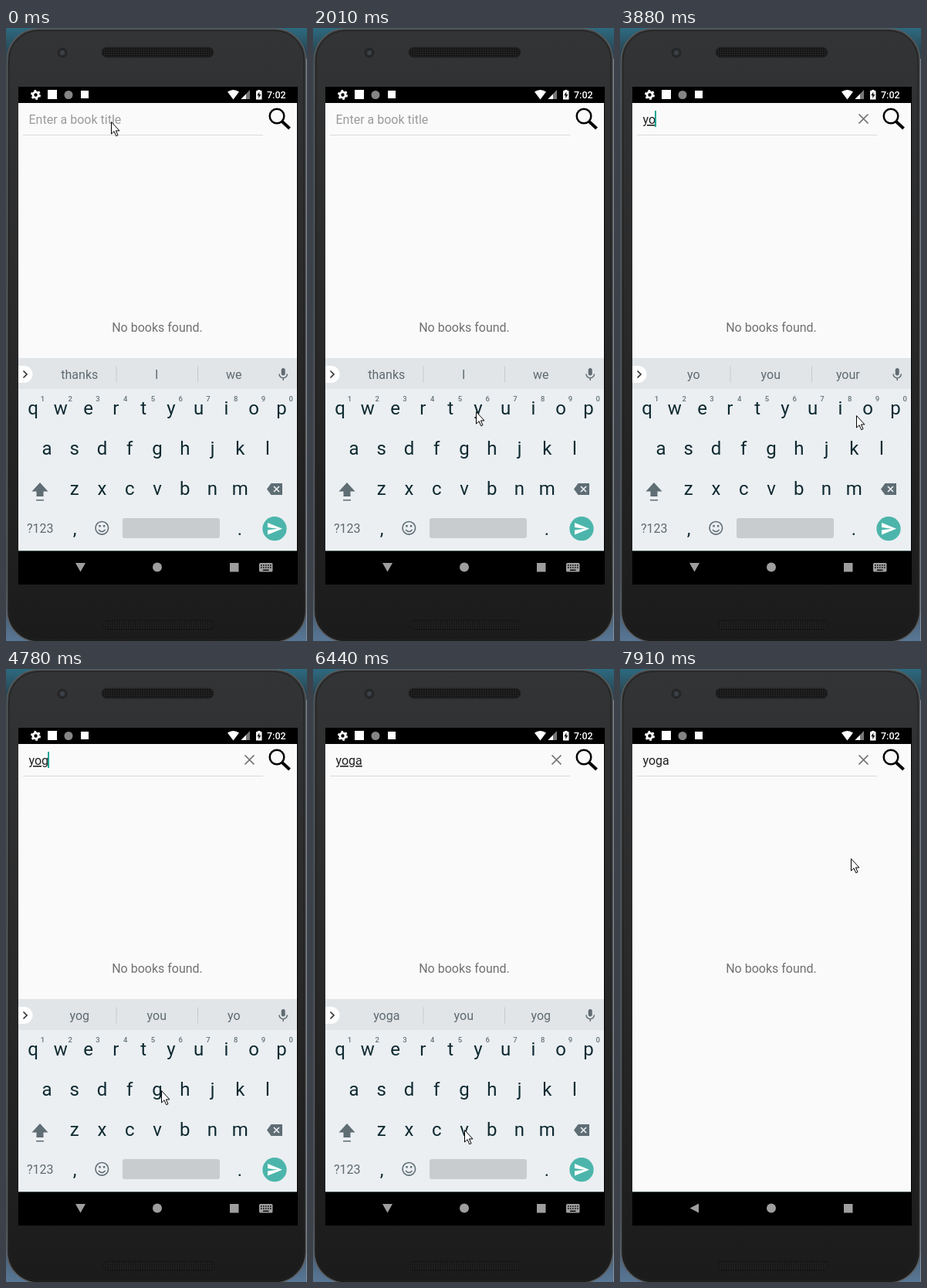
An HTML page that plays this animation: 390 px wide and 793 px high, repeating every 8 s.

```html
<!DOCTYPE html>
<html lang="en">
<head>
<meta charset="utf-8">
<title>Book search</title>
<style>
  html, body { margin: 0; width: 100%; height: 100%; overflow: hidden; background: #1c1c1c; }
  svg { display: block; width: 390px; height: 793px; font-family: Roboto, sans-serif; }
  .mid { text-anchor: middle; }
  .key { font-size: 24px; fill: #0f2a31; text-anchor: middle; }
  .digit { font-size: 9.5px; font-weight: 500; fill: #66737a; text-anchor: middle; }
  .label { font-size: 16px; fill: #5f6a70; }
</style>
</head>
<body>
<svg viewBox="0 0 390 793">
  <defs>
    <linearGradient id="desk" x2="0" y2="1">
      <stop offset="0" stop-color="#2d6a80"/><stop offset=".04" stop-color="#2a4653"/>
      <stop offset=".9" stop-color="#3a4550"/><stop offset="1" stop-color="#587796"/>
    </linearGradient>
    <linearGradient id="shell" x2="0" y2="1">
      <stop offset="0" stop-color="#333435"/><stop offset=".5" stop-color="#29292a"/>
      <stop offset="1" stop-color="#1b1b1b"/>
    </linearGradient>
    <pattern id="mesh" width="3" height="3" patternUnits="userSpaceOnUse">
      <path d="M0 0h3v3H0z" fill="#141414"/><circle cx="1.5" cy="1.5" r=".9" fill="#2b2b2b"/>
    </pattern>
    <filter id="shadow" x="-30%" y="-10%" width="160%" height="120%">
      <feDropShadow dx="0" dy="1" stdDeviation="1.3" flood-opacity=".4"/>
    </filter>
  </defs>

  <!-- phone -->
  <path d="M0 0h390v793H0z" fill="url(#desk)"/>
  <path d="M389 40h1v753h-1z" fill="#8492a0"/>
  <rect x="1.5" y="1" width="387" height="793" rx="40" fill="url(#shell)" stroke="#5a5b5c" stroke-width="1.5"/>
  <rect x="4" y="3.5" width="382" height="788" rx="38" fill="none" stroke="#202122"/>
  <circle cx="73" cy="32" r="6" fill="#272829" stroke="#222"/><circle cx="73" cy="32" r="3" fill="#3c4247"/>
  <rect x="124" y="25" width="145" height="13" rx="6.5" fill="url(#mesh)" stroke="#222"/>
  <rect x="126" y="766" width="144" height="12" rx="6" fill="url(#mesh)" stroke="#151515"/>

  <!-- screen and status bar -->
  <path d="M16 76h362v644H16z"/>
  <path d="M16 97h361v579H16z" fill="#fafafa"/>
  <g fill="#fff">
    <circle cx="38.5" cy="86.5" r="3.6" fill="none" stroke="#fff" stroke-width="2.8"/>
    <circle cx="38.5" cy="86.5" r="5.5" fill="none" stroke="#fff" stroke-width="2" stroke-dasharray="2.8 2.96"/>
    <path d="M54 80h12v12H54zM97 81h10v10H97z"/>
    <circle cx="81" cy="86.5" r="5.5" fill="#858585"/>
    <path d="M287 82.5Q294.5 77.5 302 82.5L294.5 92.5Z"/>
    <path d="M316 80V92H304.5Z" fill="#777"/><path d="M311 85.5V92H304.5Z"/>
    <path d="M326 80h3.5v1.3h2V92.5h-7.5V81.3h2z"/>
    <path d="M328.3 82.5l-3 4.8h2v3.6l3-5h-2z" fill="#000"/>
    <text x="338" y="91" font-size="12.5" font-weight="500">7:02</text>
  </g>

  <!-- search field -->
  <text id="query" x="29.5" y="124" font-size="16"></text>
  <rect id="caret" y="107" width="2" height="21" fill="#1aa595"/>
  <path d="M22 138.5h311" stroke="#dadada"/>
  <path id="clear" d="M309.5 111.5l12 12m0-12l-12 12" stroke="#707070" stroke-width="1.7"/>
  <circle cx="351" cy="114" r="9.3" fill="none" stroke="#000" stroke-width="2.5"/>
  <path d="M357.5 120.8L367.5 130" stroke="#000" stroke-width="4"/>
  <text class="mid" x="196" y="393" font-size="16" fill="#717171">No books found.</text>

  <!-- navigation bar -->
  <g fill="#9e9e9e">
    <path id="back"/>
    <circle cx="196" cy="697.5" r="6"/><path d="M290 692h11.5v11.5H290z"/>
  </g>

  <g id="keyboard">
    <path d="M16 427h361v40H16z" fill="#e1e5e8"/>
    <path d="M16 467h361v209H16z" fill="#ebeff2"/>
    <path d="M16 437h7.5a11 11 0 0 1 0 22H16z" fill="#fff"/>
    <path d="M22.5 443.5l4.5 4.5-4.5 4.5" fill="none" stroke="#333" stroke-width="1.7"/>
    <path d="M143 437.5v21M248.5 437.5v21" stroke="#c6cbce"/>
    <g id="suggestions" class="label mid"></g>
    <rect x="356.7" y="440" width="5" height="9.5" rx="2.5" fill="#606c72"/>
    <path d="M354 447.5a5.2 5.2 0 0 0 10.4 0M359.2 453v3" fill="none" stroke="#606c72" stroke-width="1.5"/>
    <g id="keys"></g>
    <g fill="#5f6d74">
      <path d="M44 588l10.5 11.5h-6V606h-9v-6.5h-6zM39 610h10v1.5H39z"/>
      <path d="M338 596.5l5.5-7.5H358v15h-14.5z"/>
      <path d="M347 593l7 7m0-7l-7 7" stroke="#ebeff2" stroke-width="1.7"/>
    </g>
    <text class="label" x="27" y="653">?123</text>
    <text class="key" x="89" y="656">,</text><text class="key" x="303" y="656">.</text>
    <g fill="none" stroke="#5f6d74" stroke-width="1.6">
      <circle cx="124.3" cy="646.8" r="8.3"/><path d="M120 649q4.3 5 8.6 0"/>
      <path d="M120.3 644.3h2.4m3.2 0h2.4" stroke-width="2.4"/>
    </g>
    <rect x="151" y="634" width="126" height="26" rx="3" fill="#c8cccf"/>
    <circle id="send" cx="348" cy="647.7" r="15.6"/>
    <path d="M339 640l19 7.8-19 7.8v-6l13-1.8-13-1.8z" fill="#fff"/>
    <rect x="328" y="692" width="17.5" height="11.5" rx="1.5" fill="#9e9e9e"/>
    <path d="M330 695h14M330 698h14" stroke="#000" stroke-width="1.6" stroke-dasharray="1.6 1.4"/>
    <path d="M333 701.3h7.5" stroke="#000" stroke-width="1.4"/>
    <g id="popup">
      <rect x="-18" y="-82" width="36" height="104" rx="3" fill="#d6dadd" filter="url(#shadow)"/>
      <text id="popupLetter" class="key" y="-48"></text>
      <path d="M6 -39.5h8" stroke="#333" stroke-width="1.5" stroke-dasharray="1.5 1.5"/>
    </g>
  </g>
  <path d="M16 676.5h361" stroke="#4c5f57"/>

  <path id="pointer" d="M.5 .5V16l3.6-3.3 2.6 6 2.3-1-2.6-5.8H11z" fill="#fff" stroke="#000"/>
</svg>

<script>
const LOOP = 8000;
const el = id => document.getElementById(id);
const set = (id, attrs) => Object.entries(attrs).forEach(([k, v]) => el(id).setAttribute(k, v));
const show = (id, on) => { el(id).style.display = on ? "" : "none"; };
const label = (cls, x, y, s) => `<text class="${cls}" x="${x}" y="${y}">${s}</text>`;

// Each key row is centred on the keyboard, apart from a shared pitch.
const PITCH = 35.75, CENTER = 196;
const keyAt = {};
let keyMarkup = "";
["qwertyuiop", "asdfghjkl", "zxcvbnm"].forEach((letters, row) => {
  const y = 500 + row * 52;
  [...letters].forEach((letter, i) => {
    const x = CENTER + (i - (letters.length - 1) / 2) * PITCH;
    keyAt[letter] = [x, y - 8];
    keyMarkup += label("key", x, y, letter);
    if (row === 0) keyMarkup += label("digit", x + 12.3, 483, (i + 1) % 10);
  });
});
el("keys").innerHTML = keyMarkup;

const WORD = "yoga", HINT = "Enter a book title";
const typedAt = [2250, 3730, 4780, 5800];
const PRESS = 120, BLINK = 500;
const SEND_DOWN = 7220, KEYBOARD_HIDDEN = 7370;
const suggestions = ["thanks I we", "y you your", "yo you your", "yog you yo", "yoga you yog"];

// Pointer moves: start time, end time and destination.
const POINTER_START = [136, 121], POINTER_STEP = 130;
const moves = [
  [950, 1890, 211, 496], [2300, 2790, 335, 497], [3730, 3880, 306, 501], [3880, 4390, 201, 545],
  [4900, 5560, 54, 545], [6100, 6980, 345, 649], [7550, 7910, 299, 245]
];

function pointerAt(t) {
  const sampled = t - (t + 20) % POINTER_STEP;
  let [px, py] = POINTER_START;
  for (const [start, end, x, y] of moves) {
    const u = Math.min(1, Math.max(0, (sampled - start) / (end - start)));
    const eased = u * (2 - u);
    px += (x - px) * eased;
    py += (y - py) * eased;
  }
  return [Math.round(px), Math.round(py)];
}

function caretOn(t) {
  const lastTap = [-BLINK, ...typedAt.map(time => time - PRESS), SEND_DOWN].findLast(time => time <= t);
  return Math.floor((t - lastTap) / BLINK) % 2 === 0;
}

function render(t) {
  const count = typedAt.filter(time => time <= t).length;
  const text = WORD.slice(0, count);
  const pressed = typedAt[count] - t <= PRESS ? WORD[count] : "";
  const typing = t < KEYBOARD_HIDDEN;

  el("query").textContent = text || HINT;
  set("query", {
    fill: text ? "#212121" : "#9b9b9b",
    "text-decoration": text && typing ? "underline" : "none"
  });
  show("clear", text);
  const textWidth = text ? el("query").getComputedTextLength() : 0;
  set("caret", { x: Math.round(28.5 + textWidth) });
  show("caret", caretOn(t));

  show("keyboard", typing);
  set("back", { d: typing ? "M90 692h13l-6.5 11.5z" : "M102 691.5v12l-11.5-6z" });
  set("send", { fill: t >= SEND_DOWN ? "#0ca296" : "#4cb5ab" });
  el("suggestions").innerHTML =
    suggestions[count].split(" ").map((word, i) => label("", 95.3 + i * 100, 454, word)).join("");

  show("popup", pressed);
  if (pressed) {
    set("popup", { transform: `translate(${keyAt[pressed]})` });
    el("popupLetter").textContent = pressed;
  }
  set("pointer", { transform: `translate(${pointerAt(t)})` });
}

function tick() {
  render(performance.now() % LOOP);
  requestAnimationFrame(tick);
}
tick();
</script>
</body>
</html>
```
